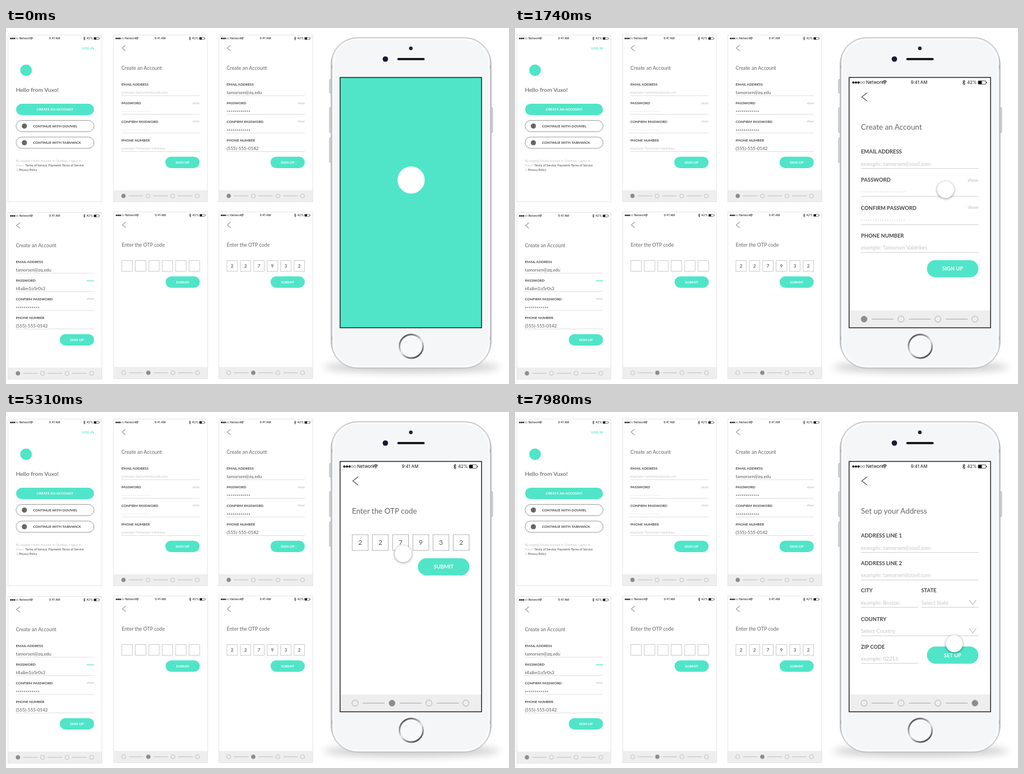
An HTML page for the animation above (8 s loop, 889x630 px).

```html
<!DOCTYPE html>
<html lang="en">
<head>
<meta charset="utf-8">
<title>Sign-up flow</title>
<style>
html, body { margin: 0; width: 100%; height: 100%; overflow: hidden; background: #fff; }
svg { display: block; width: 889px; height: 630px; }
text { font-family: Lato, "Open Sans", sans-serif; font-size: 9.33px; fill: #444; }
.status text { font: 7.7px Inter, Roboto, sans-serif; fill: #111; }
.hello { font-size: 15.5px; fill: #555; }
.title { font-size: 13.33px; fill: #666; }
.label { font-weight: 700; }
.value, .digit { font-size: 12px; fill: #555; }
.hint { fill: #c6c6c6; }
.button { font-weight: 700; fill: #fff; text-anchor: middle; }
.login { font-weight: 700; fill: #50e5c8; text-anchor: end; }
.show { font-size: 8px; font-weight: 700; fill: #c8c8c8; text-anchor: end; }
.show.on { fill: #50e5c8; }
.terms { font-size: 8px; fill: #c0c0c0; }
.terms tspan { fill: #444; }
.digit { text-anchor: middle; }
.mini .digit { font-weight: 700; fill: #666; }
.line { fill: none; stroke: #ccc; }
.mark { fill: none; stroke: #555; stroke-width: 1.3; }
#cursor { filter: drop-shadow(0 1px 2px rgba(0,0,0,.45)); }
</style>
</head>
<body>
<svg id="stage" viewBox="0 0 889 630"></svg>
<script>
const TEAL = '#50e5c8', LOOP = 8000;
const MAIL = 'tamorsen@zq.edu', HINT_MAIL = 'example: tamorsen@zovil.com';
const times = (n, fn) => Array.from({ length: n }, (_, i) => fn(i)).join('');

// Drawing helpers; all screens use the big phone's coordinates
const text = (x, y, cls, s) => `<text x="${x}" y="${y}" dy=".36em" class="${cls}">${s}</text>`;
const rect = (x, y, w, h, attrs) => `<rect x="${x}" y="${y}" width="${w}" height="${h}" ${attrs}/>`;
const dot = (x, y, r, attrs) => `<circle cx="${x}" cy="${y}" r="${r}" ${attrs}/>`;
const path = (d, attrs) => `<path d="${d}" ${attrs}/>`;
const rule = (y, x1 = 611.5, x2 = 819) => path(`M${x1} ${y}H${x2}`, 'class="line"');
const button = (x, y, s) => rect(x, y, 819 - x, 30.5, `rx="15.2" fill="${TEAL}"`)
  + text((x + 819) / 2, y + 15.2, 'button', s);
const chevron = y => path(`M803 ${y - 4}l6 8 6-8`, 'fill="none" stroke="#bbb" stroke-width="1.2"');
const dots = (y, filled) => filled
  ? times(12, i => dot(614 + i * 5.25, y, 1.65, 'fill="#777"'))
  : times(19, i => dot(613 + i * 4.15, y, .8, 'fill="#c4c4c4"'));
const field = (y, label, cls, value, x1 = 611.5, x2 = 819) =>
  text(x1, y, 'label', label) + text(x1, y + 21.3, cls, value) + rule(y + 29.7, x1, x2);

const status = '<g class="status">'
  + times(5, i => dot(598 + i * 4.6, 96.5, 1.8, `fill="${i < 3 ? '#111' : 'none'}" stroke="#111" stroke-width=".5"`))
  + text(620.5, 96.5, '', 'Network')
  + path('M650 95q3.5-3.4 7 0M651.3 96.8q2.2-2 4.4 0', 'fill="none" stroke="#111" stroke-width="1.1"')
  + dot(653.5, 98.6, 1, 'fill="#111"')
  + text(699.5, 96.5, '', '9:41 AM')
  + path('M791 94.3l4.6 4.4-2.4 2.2v-8.8l2.4 2.2-4.6 4.4', 'fill="none" stroke="#111" stroke-width=".9"')
  + text(799, 96.5, '', '42%')
  + rect(818.5, 93.5, 13.5, 6, 'rx="1" fill="none" stroke="#111" stroke-width=".7"')
  + rect(819, 94, 6, 5, 'fill="#111"') + rect(833, 95.2, 1, 2.6, 'fill="#111"') + '</g>';

const page = body => rect(590.5, 87.5, 250, 443, 'fill="#fff"') + status + body;
const step = (active, title, body) => page(
  path('M622.5 114.5l-9.5 7.5 9.5 7.5', 'class="mark"')
  + text(611.5, 175, 'title', title) + body
  + rect(590.5, 500, 250, 30.5, 'fill="#eee"')
  + times(4, i => dot(617 + i * 65.3, 515.2, 5.4, `fill="${i == active ? '#8c8c8c' : 'none'}" stroke="#999" stroke-width=".8"`))
  + times(3, i => path(`M${630.5 + i * 65.5} 515.2h38.5`, 'stroke="#999" stroke-width=".9"')));

const splash = rect(590.5, 87.5, 250, 443, `fill="${TEAL}"`) + dot(716, 269, 24, 'fill="#fff"');

const social = (y, name) => rect(612, y, 207, 30, 'rx="15" fill="none" stroke="#666"')
  + dot(634, y + 15, 6.8, 'fill="#666"') + text(657, y + 15, 'label', 'CONTINUE WITH ' + name);
const welcome = page(text(819, 122, 'login', 'LOG IN')
  + dot(638.5, 181, 15.5, `fill="${TEAL}"`)
  + text(611.5, 233.5, 'hello', 'Hello from Vuxo!')
  + button(612, 270, 'CREATE AN ACCOUNT')
  + social(314.5, 'DOVMEL') + social(358.7, 'TARNWICK')
  + text(612, 422, 'terms', 'By tapping Create Account or Continue, I agree to')
  + text(612, 434, 'terms', 'Vuxo’s <tspan>Terms of Service</tspan>, <tspan>Payments Terms of Service</tspan>')
  + text(612, 446, 'terms', '&amp; <tspan>Privacy Policy</tspan>.'));

const account = (filled, shown) => step(0, 'Create an Account',
  field(219, 'EMAIL ADDRESS', filled ? 'value' : 'hint', filled ? MAIL : HINT_MAIL)
  + field(268.3, 'PASSWORD', 'value', shown ? 't4a8m1o5r0s3' : '')
  + (shown ? '' : dots(290, filled))
  + field(318.3, 'CONFIRM PASSWORD', 'value', '') + dots(340, filled)
  + text(819, 268.7, shown ? 'show on' : 'show', 'show') + text(819, 317.5, 'show', 'show')
  + field(367.5, 'PHONE NUMBER', filled ? 'value' : 'hint',
      filled ? '(555)-555-0142' : 'example: Tamorsen Valdrikes')
  + button(728, 410.8, 'SIGN UP'));

const otp = code => step(1, 'Enter the OTP code',
  times(6, i => rect(612 + i * 35.7, 217, 28, 28, 'fill="none" stroke="#b0b0b0"')
    + text(626 + i * 35.7, 231, 'digit', code[i] || ''))
  + button(728, 258.7, 'SUBMIT'));

const profile = filled => step(2, 'Set up your Profile',
  text(611.5, 218.5, 'label', 'ADD A DISPLAY PICTURE')
  + rect(611.5, 233.5, 35, 35, 'fill="none" stroke="#c4c4c4"')
  + path('M621 251h16M629 243v16', 'stroke="#bbb" stroke-width="1.2"')
  + field(287.3, 'NAME', filled ? 'value' : 'hint', filled ? 'Halvorne Sports' : 'example: Halvorne Sports')
  + field(335.8, 'BUSINESS TYPE', 'hint', 'Select Department') + chevron(356.5)
  + button(731, 378.3, 'SET UP'));

const address = step(3, 'Set up your Address',
  field(219, 'ADDRESS LINE 1', 'hint', HINT_MAIL)
  + field(267.6, 'ADDRESS LINE 2', 'hint', HINT_MAIL)
  + field(316, 'CITY', 'hint', 'example: Boston', 611.5, 712.5)
  + field(316, 'STATE', 'hint', 'Select State', 718, 819) + chevron(336.8)
  + field(366.3, 'COUNTRY', 'hint', 'Select Country') + chevron(387)
  + field(415.2, 'ZIP CODE', 'hint', 'example: 02216', 611.5, 712.5)
  + button(728, 415, 'SET UP'));

const mini = (x, y, body) =>
  `<g class="mini" transform="translate(${x} ${y}) scale(.6655) translate(-590.5 -87.5)">${body}</g>`
  + rect(x, y, 166, 295, 'fill="none" stroke="#e4e4e4"');

const defs = `<defs>
  <linearGradient id="edge"><stop offset="0" stop-color="#b9bbbe"/><stop offset=".012" stop-color="#e9eaec"/>
    <stop offset=".988" stop-color="#e9eaec"/><stop offset="1" stop-color="#b9bbbe"/></linearGradient>
  <linearGradient id="ring" x2=".6" y2="1"><stop offset="0" stop-color="#333"/><stop offset=".35" stop-color="#999"/>
    <stop offset=".6" stop-color="#e4e4e4"/><stop offset="1" stop-color="#555"/></linearGradient>
  <filter id="soft" x="-20%" y="-200%" width="140%" height="500%"><feGaussianBlur stdDeviation="7"/></filter>
</defs>`;

const side = (x, y, h) => rect(x, y, 3.5, h, 'rx="1.2" fill="#d9dadc" stroke="#a5a7aa" stroke-width=".7"');
const phone = '<ellipse cx="717" cy="600" rx="156" ry="10" fill="#000" opacity=".2" filter="url(#soft)"/>'
  + side(571.5, 91, 24) + side(571.5, 141, 44) + side(571.5, 194.5, 43.5) + side(856.8, 141, 44)
  + rect(574.5, 17, 283, 585, 'rx="47" fill="url(#edge)" stroke="#a9abae"')
  + [66, 546].map(y => rect(574.5, y, 3, 6, 'fill="#bbb"') + rect(854.5, y, 3, 6, 'fill="#bbb"')).join('')
  + rect(578, 20, 276, 579, 'rx="44" fill="#f5f6f8" stroke="#fff" stroke-width="1.5"')
  + dot(715.5, 36, 3.2, 'fill="#222"') + dot(670.5, 55, 4.8, 'fill="#16183a"')
  + rect(691.5, 53, 48.5, 4, 'rx="2" fill="#1b1b1d"')
  + dot(716.3, 563.3, 20.8, 'fill="#f7f8fa" stroke="url(#ring)" stroke-width="2.8"');

// Screens in stacking order with the time each starts to dissolve in
const flow = [[splash, -LOOP], [welcome, 40], [account(), 1070], [account(true), 1990], [account(true, true), 3090],
  [otp(''), 3965], [otp('227932'), 4800], [profile(), 5580], [profile(true), 6560], [address, 7150]];

document.getElementById('stage').innerHTML = defs
  + mini(3.5, 12.5, welcome) + mini(190, 12.5, account()) + mini(376, 12.5, account(true))
  + mini(3.5, 326.5, account(true, true)) + mini(190.5, 325.5, otp('')) + mini(376, 325.5, otp('227932'))
  + phone + flow.map(([body]) => `<g class="screen">${body}</g>`).join('')
  + rect(590.5, 87.5, 250, 443, 'fill="none" stroke="#161616" stroke-width="1.4"')
  + dot(0, 0, 15, 'id="cursor" fill="#fff"');

const screens = [...document.querySelectorAll('.screen')];
const cursor = document.getElementById('cursor');

// Cursor moves: start, end, x, y
const moves = [[1740, 1960, 625, 252], [2430, 2680, 807, 265], [3560, 3850, 779, 424], [4480, 4720, 625, 231],
  [5190, 5430, 779, 271], [6185, 6430, 633, 257], [6870, 7100, 775, 394], [7872, 8105, 778, 430]];
// Presses: start, end
const taps = [[900, 1350], [1960, 2300], [2760, 3400], [3880, 4330], [4730, 5080], [5470, 5920], [6460, 6780], [7110, 7560]];

const ease = (t, start, end) => {
  const p = Math.min(1, Math.max(0, (t - start) / (end - start)));
  return p * p * (3 - 2 * p);
};

function draw(t) {
  screens.forEach((screen, i) => {
    const shown = ease(t, flow[i][1], flow[i][1] + 450);
    screen.style.opacity = shown;
    screen.style.display = shown ? '' : 'none';
  });
  let x = 761, y = 286, press = 0;
  for (const [start, end, tx, ty] of moves) {
    const p = ease(t, start, end);
    x += (tx - x) * p;
    y += (ty - y) * p;
  }
  for (const [start, end] of taps) press += ease(t, start, start + 90) - ease(t, end, end + 110);
  cursor.setAttribute('transform', `translate(${x} ${y}) scale(${1 - .04 * press})`);
  cursor.style.opacity = ease(t, 680, 800) * (1 - .5 * press);
}

let begin;
function tick(now) {
  begin ??= now;
  draw((now - begin) % LOOP);
  requestAnimationFrame(tick);
}
draw(0);
requestAnimationFrame(tick);
</script>
</body>
</html>
```
